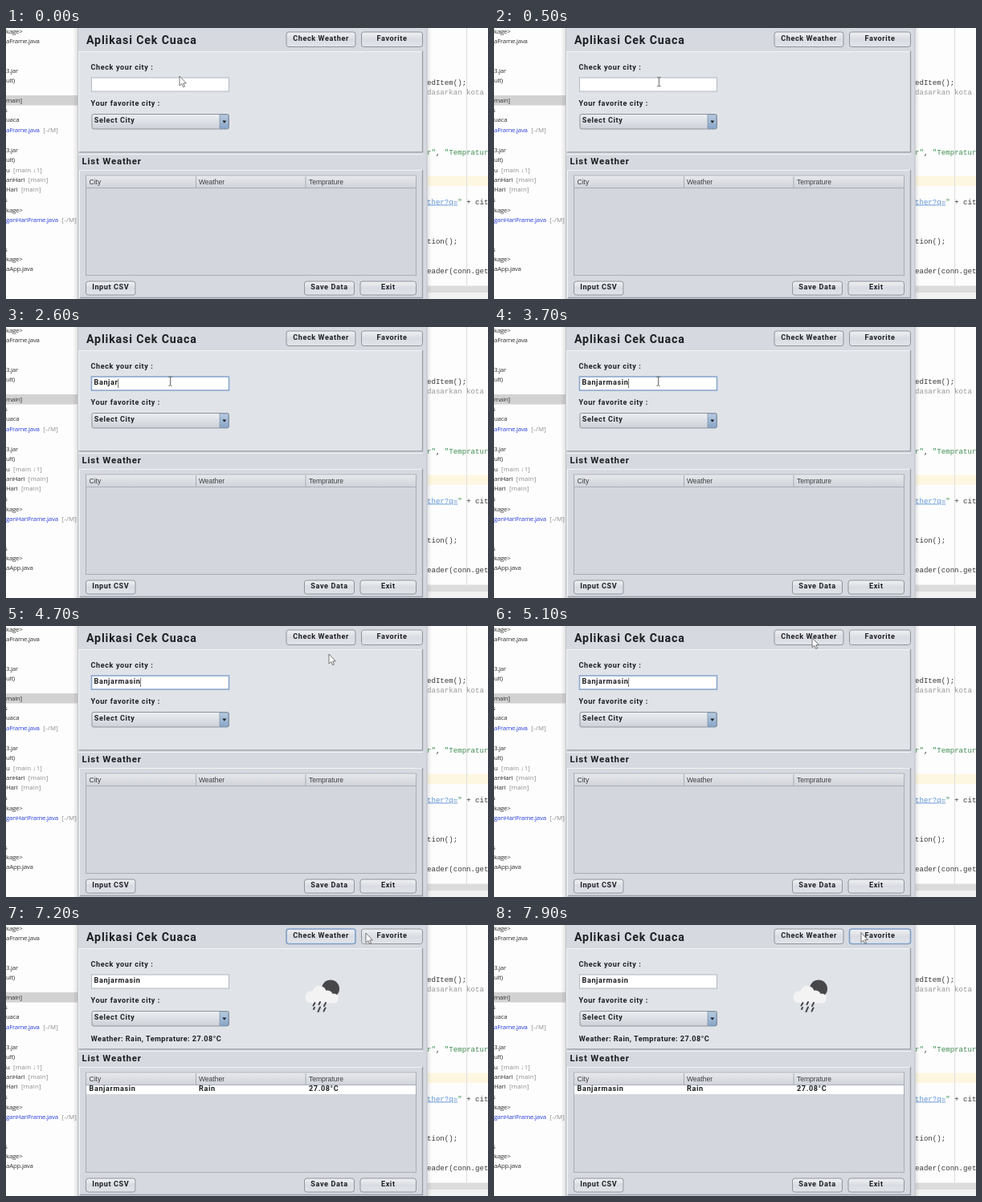
An HTML page for the animation above (8000 ms loop, 600x338 px).

```html
<!DOCTYPE html>
<html lang="id">
<head>
<meta charset="utf-8">
<title>Aplikasi Cek Cuaca</title>
<style>
html, body { margin: 0; width: 100%; height: 100%; overflow: hidden; background: #fdfdfd; }
svg { display: block; width: 600px; height: 338px; }
text { white-space: pre; }
.ui { font: bold 9.1px Roboto, sans-serif; letter-spacing: .6px; fill: #1c1e22; }
.title { font-size: 14.2px; letter-spacing: .85px; }
.head { font-size: 11.5px; letter-spacing: .78px; }
.result { letter-spacing: .46px; }
.th { font: 8.5px "Liberation Sans", Arial, sans-serif; fill: #3a3c40; }
.tree { font: 7.9px "Open Sans", sans-serif; letter-spacing: -.25px; fill: #333; }
.code { font: 9.1px "Liberation Mono", monospace; fill: #3a3a3a; }
.dim { fill: #999; }
.note { fill: #8c8c8c; letter-spacing: .2px; }
.new { fill: #2b40dd; }
.str { fill: #3f8d50; }
.url { fill: #5f93d6; text-decoration: underline; }
.btn rect { fill: url(#face); stroke: #8f949d; }
.btn text { text-anchor: middle; }
.btn.focus rect { stroke: #7d9fc8; stroke-width: 1.6; }
.btn.down rect { fill: url(#pressed); }
#field { fill: #fff; stroke: #b4b8bf; }
#field.focus { stroke: #8ba8cc; stroke-width: 1.6; }
.light { fill: none; stroke: #f3f4f6; }
.dark { fill: none; stroke: #999da6; stroke-width: 1.3; }
.grid { fill: none; stroke: #a9adb6; }
</style>
</head>
<body>
<svg viewBox="0 0 600 338">
  <defs>
    <linearGradient id="face" x2="0" y2="1">
      <stop stop-color="#f1f2f4"/><stop offset=".5" stop-color="#d9dce2"/><stop offset="1" stop-color="#e1e4e9"/>
    </linearGradient>
    <linearGradient id="pressed" x2="0" y2="1">
      <stop stop-color="#93a1b3"/><stop offset=".5" stop-color="#a9b5c4"/><stop offset="1" stop-color="#c0cad6"/>
    </linearGradient>
    <linearGradient id="arrow" x2="0" y2="1">
      <stop stop-color="#b9cbdf"/><stop offset="1" stop-color="#87a6c8"/>
    </linearGradient>
    <linearGradient id="combo" x2="0" y2="1">
      <stop stop-color="#eceef1"/><stop offset="1" stop-color="#cdd1d8"/>
    </linearGradient>
    <linearGradient id="header" x2="0" y2="1">
      <stop stop-color="#e6e8ec"/><stop offset="1" stop-color="#d1d4da"/>
    </linearGradient>
    <linearGradient id="shade">
      <stop stop-opacity="0"/><stop offset="1" stop-opacity=".1"/>
    </linearGradient>
  </defs>

  <rect width="600" height="338" fill="#fdfdfd"/>
  <rect y="84" width="90" height="12.500" fill="#d2d2d2"/>
  <g id="tree" class="tree"></g>

  <rect x="524" y="184.500" width="76" height="12.500" fill="#fdf7e2"/>
  <path d="M573.500 0V321" stroke="#dedede"/>
  <g class="code">
    <text x="524" y="71">edItem();</text>
    <text x="524" y="83" class="dim">dasarkan kota</text>
    <text x="524" y="157.500"><tspan class="str">r"</tspan>, <tspan class="str">"Tempratur</tspan></text>
    <text x="524" y="219.500"><tspan class="url">ther?q=</tspan><tspan class="str">"</tspan> + cit</text>
    <text x="524" y="269">tion();</text>
    <text x="524" y="306">eader(conn.get</text>
  </g>
  <rect x="524" y="321.500" width="76" height="8.500" fill="#dcdcdc"/>
  <rect x="524" y="330" width="76" height="8" fill="#f2f2f2"/>
  <rect x="83" width="6" height="338" fill="url(#shade)"/>
  <rect x="-530" width="6" height="338" fill="url(#shade)" transform="scale(-1 1)"/>

  <!-- application window -->
  <rect x="89" width="435.500" height="338" fill="#d6d9df"/>
  <path d="M89.500 0V338M524 0V338" stroke="#c0c3c9"/>
  <rect x="91" y="29" width="427" height="125.500" fill="#e0e3e8"/>
  <path class="light" d="M90.500 154V29.500H518M90 157.500H519M91.500 336V177.500H518"/>
  <path class="dark" d="M91 154.800H518.500V29M92 336.500H518.500V177"/>

  <g class="ui">
    <text class="title" x="100" y="19.500">Aplikasi Cek Cuaca</text>
    <text x="105.500" y="51.500">Check your city :</text>
    <text x="105.500" y="97">Your favorite city :</text>
    <text class="head" x="94.500" y="169.800">List Weather</text>
    <rect id="field" x="106.500" y="62" width="171" height="17"/>
    <text id="typed" x="109.500" y="72.300"></text>
    <path id="caret" d="M0 64.500V76" stroke="#666" stroke-width=".9"/>
    <rect x="107" y="107.500" width="170.500" height="18.500" rx="2" fill="url(#combo)" stroke="#8f949d"/>
    <path d="M266 108H275.500Q277 108 277 109.500V124Q277 125.500 275.500 125.500H266Z" fill="url(#arrow)" stroke="#7890aa" stroke-width=".7"/>
    <path d="M269.300 115.500H274.300L271.800 118.800Z" fill="#222"/>
    <text x="109.800" y="118.200">Select City</text>
    <g id="buttons"></g>
  </g>

  <!-- table -->
  <rect class="grid" x="99.500" y="184" width="411" height="124.500" style="fill:#d3d6dc"/>
  <rect x="100" y="184.500" width="410" height="14.500" fill="url(#header)"/>
  <path class="grid" d="M100 199.500H510M236.500 185V199M373 185V199"/>
  <g class="th">
    <text x="103.500" y="194.700">City</text>
    <text x="240" y="194.700">Weather</text>
    <text x="377" y="194.700">Temprature</text>
  </g>

  <g id="report" class="ui">
    <rect x="100" y="200" width="410" height="11" fill="#fff"/>
    <text x="103.500" y="207.400">Banjarmasin</text>
    <text x="240" y="207.400">Rain</text>
    <text x="377" y="207.400">27.08°C</text>
    <text class="result" x="105.800" y="144.600">Weather: Rain, Temprature: 27.08°C</text>
    <circle cx="404" cy="79.500" r="11" fill="#48484a"/>
    <g fill="#f3f3f3">
      <circle cx="380" cy="90" r="7.500"/><circle cx="390" cy="84.500" r="8.800"/>
      <circle cx="400" cy="88.500" r="7"/><circle cx="408" cy="91.500" r="6"/>
      <rect x="379" y="88" width="30" height="9.500" rx="4"/>
    </g>
    <path d="M384.500 97L382.500 100.500M391 96L389.500 99M398 97L396 101M384 103L383 105M391 102.500L388.500 108M397.500 103.500L395.500 107.500" stroke="#48484a" stroke-width="2" stroke-linecap="round"/>
  </g>

  <g id="pointer">
    <path id="hand" d="M0 0V12L2.800 9.600L4.700 13.700L6.500 12.900L4.700 8.900H8.300Z" fill="#fff" stroke="#555" stroke-width=".8"/>
    <path id="beam" d="M-2.200 -5.500H-.6L0 -5L.6 -5.500H2.200M0 -5V5M-2.200 5.500H-.6L0 5L.6 5.500H2.200" fill="none" stroke="#555" stroke-width=".9"/>
  </g>
</svg>
<script>
const $ = id => document.getElementById(id);

// [centre y, text, grey suffix, modified]
const files = [
  [4, "kage>"], [16, "aFrame.java"], [53, "3.jar"], [65, "ult)"], [90, "main]"],
  [102, "s"], [114, "uaca"], [127, "aFrame.java", "  [-/M]", 1], [152, "3.jar"], [164, "ult)"],
  [177, "u", "  [main ↓1]"], [189, "anHari", "  [main]"], [201, "Hari", "  [main]"], [214, "s"],
  [227, "kage>"], [239, "ganHariFrame.java", "  [-/M]", 1], [276, "s"], [288, "kage>"], [300, "aApp.java"]
];
$("tree").innerHTML = files.map(([y, name, note = "", fresh]) =>
  `<text x="${name === "s" ? -2 : 0}" y="${y + 2.8}"><tspan class="${fresh ? "new" : ""}">${name.replace(">", "&gt;")}</tspan><tspan class="note">${note}</tspan></text>`
).join("");

const buttons = [
  ["check", "Check Weather", 349, 5, 86], ["fav", "Favorite", 442.5, 5, 76],
  ["csv", "Input CSV", 99.5, 316, 61.5], ["save", "Save Data", 371.5, 316, 62], ["exit", "Exit", 441, 316, 69.500]
];
$("buttons").innerHTML = buttons.map(([id, label, x, y, w]) =>
  `<g id="${id}" class="btn"><rect x="${x}" y="${y}" width="${w}" height="${y < 9 ? 18.5 : 17}" rx="3"/>` +
  `<text x="${x + w / 2}" y="${y + (y < 9 ? 11.300 : 10.400)}">${label}</text></g>`
).join("");

const LOOP = 8000, STEP = 100;
const word = "Banjarmasin";
const keys = [1500, 1700, 2000, 2100, 2500, 2600, 3100, 3300, 3400, 3600, 3700];
// [time, x, y] of the pointer tip
const path = [
  [0, 216, 60], [600, 204.5, 67.7], [4000, 204.5, 67.7], [4700, 402, 35], [4800, 402, 35],
  [5200, 395, 11], [7000, 395, 11], [7200, 448, 10], [7600, 457, 9.500], [LOOP, 457, 9.500]
];

const within = (t, a, b) => t >= a && t < b;
const show = (id, on) => $(id).setAttribute("visibility", on ? "visible" : "hidden");
const mark = (id, name, on) => $(id).classList.toggle(name, on);
const ease = p => p * p * (3 - 2 * p);

function pointerAt(t) {
  const i = path.findIndex(p => p[0] > t);
  const [t0, x0, y0] = path[i - 1], [t1, x1, y1] = path[i];
  const p = ease((t - t0) / (t1 - t0));
  return [x0 + (x1 - x0) * p, y0 + (y1 - y0) * p];
}

function draw(t) {
  const [x, y] = pointerAt(t);
  $("pointer").setAttribute("transform", `translate(${x} ${y})`);
  const overField = x > 106 && x < 278 && y > 61 && y < 80;
  show("beam", overField);
  show("hand", !overField);

  const count = keys.filter(k => k <= t).length;
  $("typed").textContent = word.slice(0, count);
  const end = count ? $("typed").getComputedTextLength() : 0;
  $("caret").setAttribute("transform", `translate(${109.7 + end} 0)`);
  show("caret", within(t, 1200, 5200) && !within(t, 4200, 4700));

  mark("field", "focus", within(t, 1000, 5200));
  mark("check", "focus", within(t, 5200, 7700));
  mark("check", "down", within(t, 5300, 6500));
  mark("fav", "focus", t >= 7700);
  mark("fav", "down", within(t, 7700, 7900));
  show("report", t >= 6500);
}

const start = performance.now();
function tick() {
  const t = (performance.now() - start) % LOOP;
  draw(Math.floor(t / STEP) * STEP);
  requestAnimationFrame(tick);
}
tick();
</script>
</body>
</html>
```
